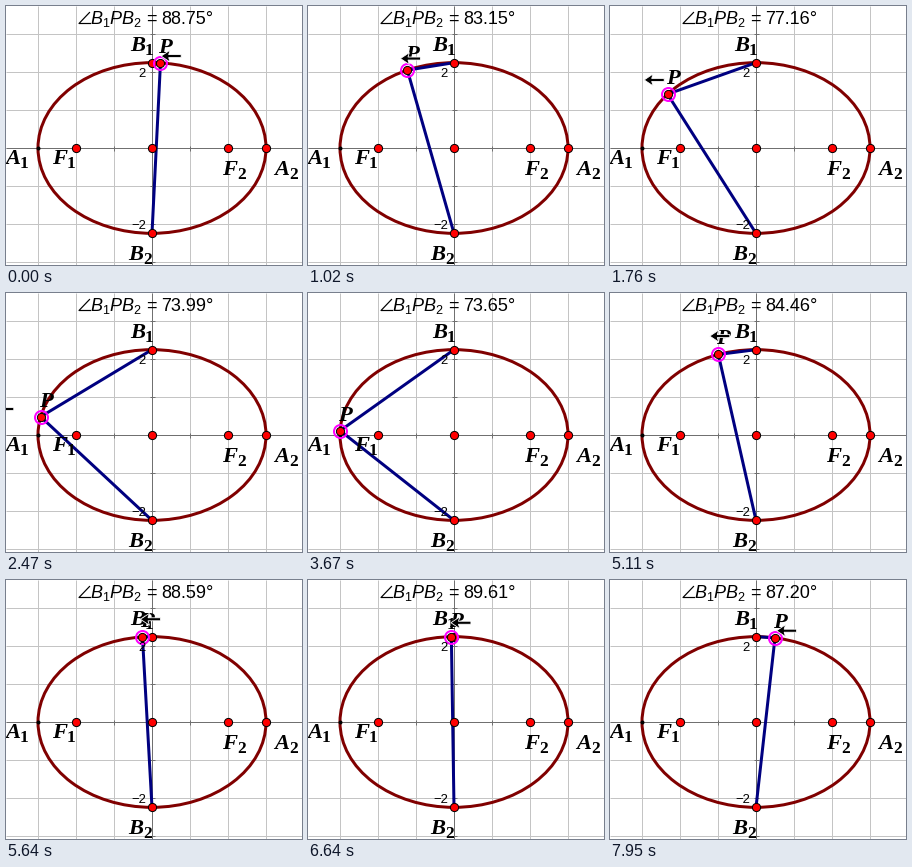
Write a matplotlib script that moves like this. It is 296 px wide and 259 px high and loops after 8000 ms.

```python
import numpy as np
import matplotlib.pyplot as plt
from matplotlib.animation import FuncAnimation
from matplotlib.patches import Ellipse, Polygon

W, H, DPI = 296, 259, 100
LOOP, INTERVAL, TICK = 8000, 20, 60
PX = 72 / DPI
CX, CY, UNIT = 146, 142, 38
A, B = 114, 85.33
TAN_AT_VERTEX = 2 * A * B / (A * A - B * B)

# The drag: times in ms and the ellipse parameter of P in degrees
TIMES = [0, 1020, 2460, 2830, 3660, 5100, 5640, 6600, 7040, 7920]
DEGREES = [85.74, 114.14, 167.63, 177.1, 177.1, 109.28, 94.8, 91.328, 90, 80.416]

fig = plt.figure(figsize=(W / DPI, H / DPI), dpi=DPI, facecolor="white")
ax = fig.add_axes([0, 0, 1, 1])
ax.set_xlim(0, W)
ax.set_ylim(H, 0)
ax.axis("off")


def text(x, y, s, size, font="Liberation Sans", **kw):
    return ax.text(x, y, s, fontsize=size * PX, family=font,
                   va="baseline", zorder=6, **kw)


def label(x, y, letter, sub=""):
    name = text(x, y, letter, 22.5, "Liberation Serif",
                weight="bold", style="italic")
    if sub:
        text(x + 15, y + 4, sub, 17.5, "Liberation Serif", weight="bold")
    return name


def dots(xs, ys, zorder=4):
    return ax.plot(xs, ys, "o", ms=8.2 * PX, mfc="red", mec="black",
                   mew=PX, zorder=zorder)[0]


def rules(xs, ys, color, reach=None):
    """Vertical lines at xs and horizontal lines at ys, or short axis ticks."""
    top, bottom = (CY - reach, CY + reach) if reach else (0, H)
    left, right = (CX - reach, CX + reach) if reach else (0, W)
    ax.vlines(xs, top, bottom, color=color, lw=PX, zorder=1)
    ax.hlines(ys, left, right, color=color, lw=PX, zorder=1)


# Grid, axes and ticks
units = UNIT * np.arange(-4, 5)
rules(CX + units, CY + units, "#c4c4c4")
rules(CX, CY, "#707070")
rules(CX + units, CY + units, "#707070", reach=2.5)
for n, s in ((2, "2"), (-2, "\u22122")):
    text(CX - 6, CY - n * UNIT + 5, s, 13, ha="right")

# Ellipse and fixed points
ax.add_patch(Ellipse((CX, CY), 2 * A, 2 * B, fill=False,
                     ec="#800000", lw=3 * PX, zorder=2))
ax.plot([CX - A], [CY], "o", ms=4 * PX, color="black", mew=0, zorder=4)
dots(CX + np.array([-2 * UNIT, 0, 2 * UNIT, A]), [CY] * 4)
dots([CX, CX], [CY - B, CY + B])
label(-1, 158, "A", "1")
label(46, 158, "F", "1")
label(216, 169, "F", "2")
label(268, 169, "A", "2")
label(124, 45, "B", "1")
label(122, 254, "B", "2")

# Measurement heading
ax.plot([83.5, 73, 84.5], [6.5, 17.5, 17.5], color="black", lw=1.2 * PX)
for x, letter in ((84, "B"), (103, "P"), (115, "B")):
    text(x, 18, letter, 18, style="italic")
text(96, 21, "1", 12.5)
text(127, 21, "2", 12.5)
text(140, 18, "=", 18)
value = text(155, 18, "", 18)
undefined = text(155, 18, "未定义", 18, "Noto Sans CJK JP")

# Moving parts
sides, = ax.plot([], [], color="#000080", lw=3 * PX, zorder=3)
point = dots([], [], 5)
ring, = ax.plot([], [], "o", ms=13 * PX, mfc="none", mec="magenta",
                mew=2 * PX, zorder=5)
p_name = label(0, 0, "P")
arrow = np.array([(0, 0), (9, -6), (7.5, -1.5), (20, -1.5),
                  (20, 1.5), (7.5, 1.5), (9, 6)])
cursor = ax.add_patch(Polygon(arrow, fc="black", ec="white", lw=0.8 * PX,
                              zorder=7))


def update(k):
    t = k * INTERVAL // TICK * TICK
    angle = np.radians(np.interp(t, TIMES, DEGREES))
    c, s = np.cos(angle), np.sin(angle)
    dx, dy = A * c, -B * s
    x, y = CX + dx, CY + dy

    sides.set_data([CX, x, CX], [CY - B, y, CY + B])
    point.set_data([x], [y])
    ring.set_data([x], [y])
    p_name.set_position((x - 2, y - 10))

    # The cursor drags P along the ray from the centre, drifting outwards
    pull = 1.08 + 0.23 * c**4 + 0.16 * np.sin(np.pi * t / LOOP)
    cursor.set_xy(arrow + (CX + pull * dx, CY + pull * dy))

    at_b1 = abs(dx) < 0.5
    undefined.set_visible(at_b1)
    value.set_visible(not at_b1)
    value.set_text(f"{np.degrees(np.arctan2(TAN_AT_VERTEX, abs(c))):.2f}°")
    return sides, point, ring, p_name, cursor, value, undefined


anim = FuncAnimation(fig, update, frames=LOOP // INTERVAL, interval=INTERVAL,
                     init_func=lambda: update(0), repeat=True, repeat_delay=0)
plt.show()
```
